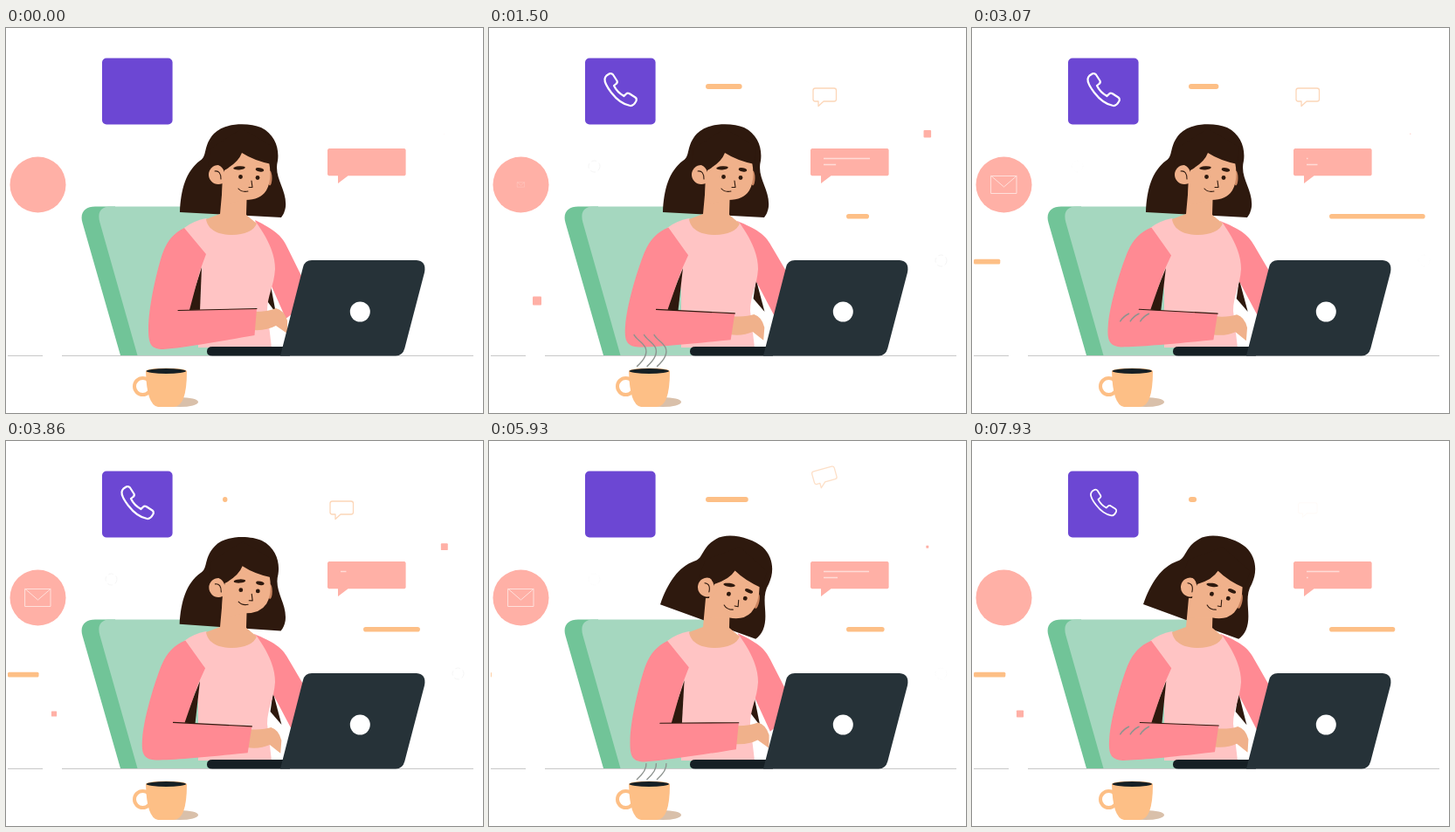
Write an HTML page that moves like this. It is 546 px wide and 441 px high and loops after 8 s.

```html
<!DOCTYPE html>
<html lang="en">
<head>
<meta charset="utf-8">
<title>At the desk</title>
<style>
  html, body { margin: 0; width: 100%; height: 100%; overflow: hidden; background: #fff; }
  svg { display: block; width: 100%; height: 100%; }
  .line { fill: none; stroke-linecap: round; stroke-linejoin: round; }
  .pink { fill: #ffb0a6; }
  .yellow { fill: #fdbf86; }
  .skin { fill: #f0b18b; }
  .hair { fill: #2e190e; }
  .sleeve { fill: #ff8a93; }
</style>
</head>
<body>
<svg viewBox="0 0 546 441">
  <rect x="110" y="34.5" width="80.6" height="76" rx="5" fill="#6c47d3"/>
  <g id="phone">
    <path class="line" stroke="#fff" stroke-width="2.2" transform="translate(150.5 70.5)" d="M-16-16L-12.5-18.2Q-10-19-8.5-17L-4-10Q-3-8-5-6.5L-7.5-4.5Q-4 3 4 7.5L6.5 5Q8 3.5 10 4.5L17 9Q19 10.5 18 13Q15 19 11 18.5Q-0.5 16.5-10.5 3.5Q-18.5-7-18-12Q-17.5-14.5-16-16Z"/>
  </g>

  <circle class="pink" cx="36.5" cy="179.5" r="32"/>
  <path id="mail" class="line" stroke="#ffe0db" d="M22 169.5H51V189.5H22ZL36.5 182L51 169.5"/>

  <path class="pink" d="M369.5 138H456.3L457.6 139.5V168L456.3 169.3H391.5L380 178V169.3H369.5L368 168V139.5Z"/>
  <path id="text" stroke="#ffdcd7" stroke-width="1.4"/>

  <path id="bubble" class="line" stroke="#fcd6b8" stroke-width="1.3" d="M373.5 69H395Q397.5 69 397.5 71.5V81.5Q397.5 84 395 84H383L377 89.5V84H373.5Q371 84 371 81.5V71.5Q371 69 373.5 69Z"/>

  <rect id="barTop" class="yellow" x="248" y="64" height="6" rx="3"/>
  <rect id="barRight" class="yellow" x="409" y="213" height="5.6" rx="2.8"/>
  <rect id="barLeft" class="yellow" x="2" y="264.8" height="5.6" rx="1.5"/>
  <rect id="squareRight" class="pink" x="497.5" y="117" width="8.6" height="8.4" rx="1"/>
  <rect id="squareLeft" class="pink" x="50" y="307.5" width="10" height="10" rx="1"/>
  <g id="rings" class="line" stroke="#f5f5f5" stroke-dasharray="5 4">
    <circle cx="120.5" cy="158.5" r="6.5"/>
    <circle cx="517.5" cy="266.5" r="6.5"/>
  </g>

  <path stroke="#c4c4c4" d="M2 375.4H42M64 375.4H535"/>

  <path fill="#71c498" d="M102 204.5H125L152 375H131L87.5 223C84 211 91 204.5 102 204.5Z"/>
  <path fill="#a5d7bf" d="M119 204.5H246V375H150.5L107.5 223C104 211 109 204.5 119 204.5Z"/>

  <path id="hairBack" class="hair" d="M199 211C200 185 206 164 222 152C231 147 225 135 238 121C250 108 278 108 292 114C308 122 313 138 311 152C306 172 322 185 320 205Q319 212 315 217Z"/>

  <g id="armRight">
    <path class="hair" d="M306 288L303 310L316 325Z"/>
    <path class="sleeve" d="M284 221C306 230 316 236 323 249L342 281L355 306L328 331L306 290Z"/>
  </g>
  <path fill="#ffc4c4" d="M229 218Q258 252 286 222C301 243 308 260 308 276C307 295 299 307 299 324L304 366H220V300L204 229Q214 221 229 218Z"/>

  <path class="skin" d="M229 219C231 232 244 237 259 237C273 237 284 232 287 224L275 214L276 180H248L245 213Z"/>
  <g id="face">
    <ellipse cx="302" cy="172" rx="2.5" ry="8.5" fill="#c9845f"/>
    <path class="skin" d="M248 155L270 141L301 153Q305 174 298 186Q291 197 274 197L247 203Z"/>
    <circle class="skin" cx="243" cy="168" r="11"/>
    <path class="hair" d="M231 161Q236 156 243 157Q248 159 250 165L250 163Q266 154 270 143Q284 152 304 156L306 136L270 115L234 138Z"/>
    <g class="hair">
      <ellipse cx="267" cy="160.3" rx="6.8" ry="2.1" transform="rotate(-4 267 160)"/>
      <ellipse cx="290.5" cy="162.3" rx="4.8" ry="2.1" transform="rotate(10 290 162)"/>
      <circle cx="268.5" cy="170.5" r="2.4"/>
      <circle cx="288" cy="171.5" r="2.4"/>
    </g>
    <path class="line" stroke="#2e190e" stroke-width="1.1" d="M281 175L282 182.5H278M266 184Q270 188.5 277 187M239 164Q246 163 246 173"/>
  </g>

  <g id="armLeft">
    <path class="hair" d="M224 274L208 324H222Z"/>
    <path class="skin" d="M284 325Q300 325 309 321Q318 323 322 335V350L309 341Q298 347 283 346Z"/>
    <path class="sleeve" d="M204 229L229 259L222 278L210 323L287 321.5L284.5 352C250 358 205 366 180 368C166 368 163 362 163 345C163 320 172 282 177 265C182 247 190 236 204 229Z"/>
    <path class="line" stroke="#2e190e" stroke-width="1.1" d="M197 323.5L287 321.5"/>
  </g>

  <path fill="#151f24" d="M236 365H325V375.5H236Q230 375.5 230 370.5Q230 365 236 365Z"/>
  <path fill="#263238" d="M350 266H470Q481.5 267 479 280L456.3 367Q454 375.5 446 375.5H314L340 274Q342 266 350 266Z"/>
  <circle cx="405.3" cy="325" r="11.5" fill="#fff"/>

  <ellipse cx="199" cy="428.5" rx="21" ry="5.5" fill="#d9c0aa"/>
  <circle class="line" cx="156.5" cy="410.5" r="9.5" stroke="#fdbf86" stroke-width="4"/>
  <path class="yellow" d="M160 393H207Q207 434 192 434H174Q161 432 160 393Z"/>
  <ellipse class="yellow" cx="183.5" cy="393" rx="23.5" ry="3.4"/>
  <ellipse cx="183.3" cy="393" rx="22.8" ry="2.9" fill="#151f24"/>
  <g id="steam" fill="none" stroke="#8d938f" stroke-width="1.4"></g>
</svg>
<script>
const LOOP = 8000, TYPING = 3600, STEAM = 4860, BAR = 4200;
const get = id => document.getElementById(id);
const set = (id, name, value) => get(id).setAttribute(name, value);

// Eased rise from 0 to 1.
function ramp(t, start, length) {
  const u = Math.min(Math.max((t - start) / length, 0), 1);
  return (1 - Math.cos(Math.PI * u)) / 2;
}
// Endless swing between 0 and 1, highest at peak.
const swing = (t, peak, period) => Math.cos(Math.PI * (t - peak) / period) ** 2;

const turn = (id, angle, x, y) => set(id, "transform", `rotate(${angle} ${x} ${y})`);
const scaleAt = (id, x, y, s) =>
  set(id, "transform", `translate(${x} ${y}) scale(${Math.max(s, .001)}) translate(${-x} ${-y})`);

for (let i = 0; i < 3; i++) {
  get("steam").insertAdjacentHTML("beforeend",
    `<path pathLength="100" transform="translate(${i * 11.5} 0)"
      d="M169 388C178 380 182 373 179 366C175 358 164 355 165.5 347C167 339 171 331 180 327"/>`);
}
const wisps = [...get("steam").children];

function drawIcons(t) {
  scaleAt("phone", 150.5, 70.5, ramp(t, 0, 1080) - ramp(t, 4200, 1550) + ramp(t, 6900, 1450));
  scaleAt("mail", 36.5, 179.5, ramp(t, 1100, 1150) - ramp(t, 6000, 1500));

  const typed = t % TYPING;
  const first = 53 * (ramp(typed, 0, 1150) - ramp(typed, 2250, 920));
  const second = 16 * (ramp(typed, 450, 1350) - ramp(typed, 2900, 550));
  set("text", "d", `M383 149.5h${first}M383 156.5h${second}`);

  // The small bubble drifts off upwards, then grows back in place.
  const gone = t < 7000 ? ramp(t, 4900, 1500) : 0;
  const size = t < 7000 ? ramp(t, 0, 900) : ramp(t, 7000, 1300);
  const alpha = t < 7000 ? 1 - ramp(t, 5600, 1100) : ramp(t, 7400, 1600) / 2;
  set("bubble", "transform",
    `translate(384.5 ${78 - 48 * gone}) rotate(${-20 * gone}) scale(${Math.max(size, .001)}) translate(-384.5 -78)`);
  set("bubble", "opacity", size * alpha);
}

function drawShapes(t) {
  const bar = (id, width, peak) =>
    set(id, "width", t < peak - BAR / 2 ? 0 : width * swing(t, peak, BAR));
  bar("barTop", 55, 2190);
  bar("barRight", 111, 2925);
  bar("barLeft", 36.5, 3640);

  const pulse = swing(t, 1480, 2620);
  scaleAt("squareRight", 501.8, 121.2, pulse);
  set("rings", "opacity", pulse);
  scaleAt("squareLeft", 55, 312.5, swing(t, 1500, 3000));
}

function drawWoman(t) {
  const tilt = ramp(t, 3500, 2500);
  turn("hairBack", 17 * tilt, 277.5, 189);
  turn("face", 12 * tilt, 249, 201);

  const tap = ramp(t, 0, 600) * (.15 + .82 * swing(t, 1440, 828));
  turn("armLeft", 4.5 * tap, 210, 247);
  turn("armRight", 4.5 * (1 - tap), 298, 235);
}

function drawSteam(t) {
  const puff = (t - 280 + STEAM) % STEAM;
  const head = 100 * ramp(puff, 0, 2150), tail = 100 * ramp(puff, 1150, 2300);
  for (const wisp of wisps) {
    wisp.setAttribute("stroke-dasharray", `0 ${tail} ${head - tail} 200`);
    wisp.setAttribute("visibility", head - tail > .5 ? "visible" : "hidden");
  }
}

function tick() {
  const t = performance.now() % LOOP;
  for (const draw of [drawIcons, drawShapes, drawWoman, drawSteam]) draw(t);
  requestAnimationFrame(tick);
}
tick();
</script>
</body>
</html>
```
